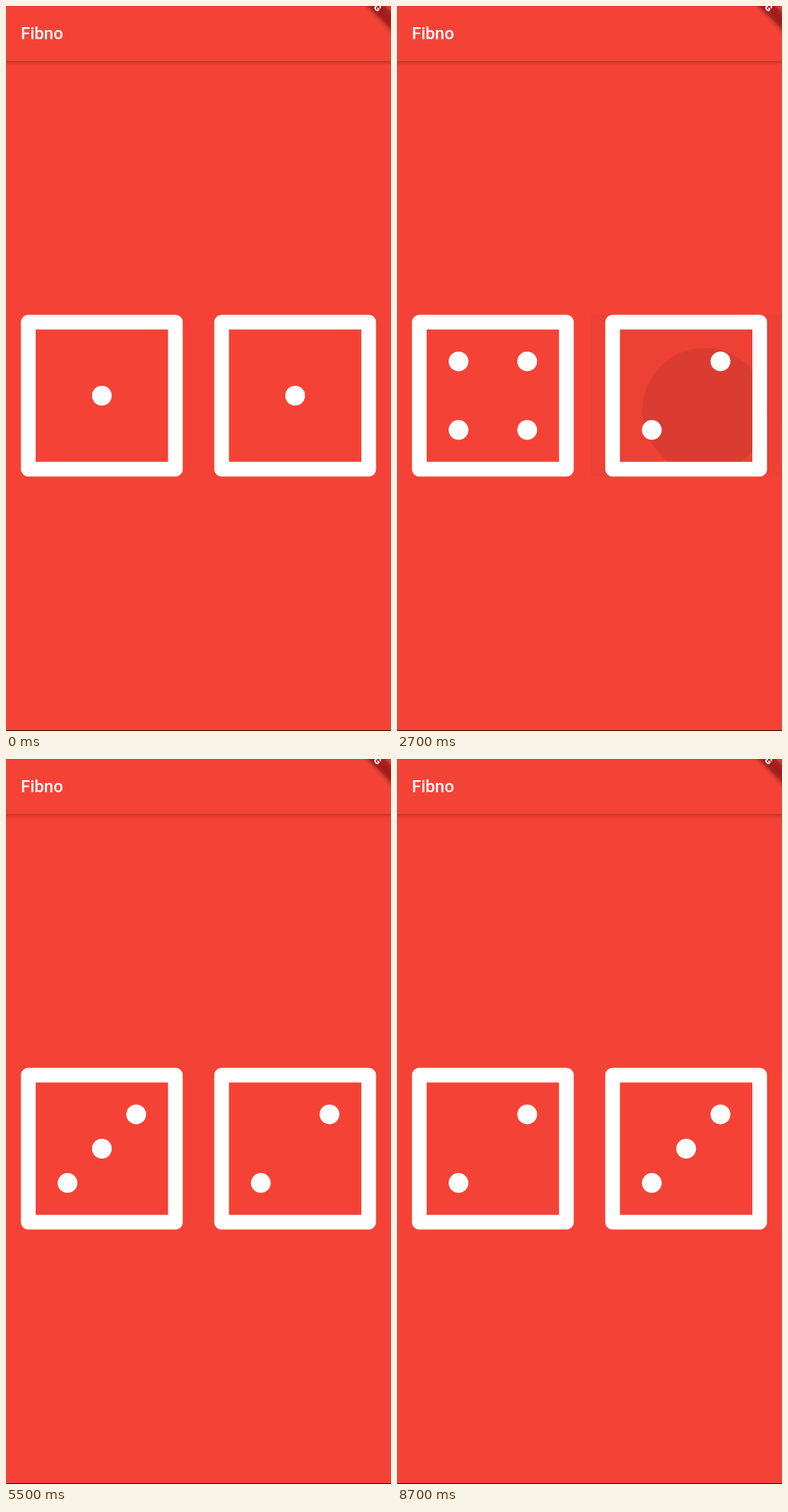
These frames come from a looping animation (545 by 1027 pixels, 8.8 s). An HTML page:

```html
<!DOCTYPE html>
<html lang="en">
<head>
<meta charset="utf-8">
<title>Dice roller</title>
<style>
  html, body { margin: 0; width: 100%; height: 100%; overflow: hidden; background: #f44336; }
  svg { display: block; width: 100%; height: 100%; }
  text { font-family: Roboto, sans-serif; fill: #fff; }
</style>
</head>
<body>
<svg viewBox="0 0 545 1027">
  <defs>
    <linearGradient id="shade" x2="0" y2="1">
      <stop offset="0" stop-color="#000" stop-opacity=".22"/>
      <stop offset=".4" stop-color="#000" stop-opacity=".09"/>
      <stop offset="1" stop-color="#000" stop-opacity="0"/>
    </linearGradient>
    <filter id="blur" x="-50%" y="-100%" width="200%" height="300%">
      <feGaussianBlur stdDeviation="3.5"/>
    </filter>
    <clipPath id="button"><rect x="274" y="437.5" width="271" height="229" rx="2.5"/></clipPath>
    <path id="frame" fill="#fff" fill-rule="evenodd"
      d="M-104.5-114.5h209a10 10 0 0 1 10 10v209a10 10 0 0 1-10 10h-209a10 10 0 0 1-10-10v-209a10 10 0 0 1 10-10z
         M-93.7-93.7v187.4h187.4v-187.4z"/>
  </defs>

  <rect width="545" height="1027" fill="#f44336"/>
  <rect y="78" width="545" height="7" fill="url(#shade)"/>
  <text x="21" y="47" font-size="24" font-weight="500">Fibno</text>
  <rect width="545" height="1" fill="#000" opacity=".1"/>

  <g transform="translate(524) rotate(45)">
    <rect x="-60" y="-8" width="120" height="16" opacity=".5" filter="url(#blur)"/>
    <rect x="-60" y="-8" width="120" height="16" fill="#b71c1c" fill-opacity=".63"/>
    <text x="3" y="4.8" font-size="13.4" font-weight="900" text-anchor="middle">G</text>
  </g>

  <g clip-path="url(#button)">
    <rect id="highlight" x="274" y="437" width="271" height="230"/>
    <circle id="ripple"/>
  </g>
  <g class="die" transform="translate(135.7 552)"><use href="#frame"/></g>
  <g class="die" transform="translate(409.3 552)"><use href="#frame"/></g>
  <rect y="1026" width="545" height="1" fill="#1a0505"/>
</svg>

<script>
const LOOP = 8800, STEP = 100, FADE = 200, INK = 0.12;
const CENTER = { x: 409.5, y: 552 };
const GAP = 48.6;

// Press time, hold length, touch point, and the faces shown on release
const taps = [
  { at: 2575, hold: 65, x: 452, y: 586, faces: [4, 2] },
  { at: 3575, hold: 65, x: 457, y: 589, faces: [5, 3] },
  { at: 4720, hold: 10, x: 488, y: 611, faces: [2, 5] },
  { at: 5250, hold: 50, x: 460, y: 592, faces: [3, 2] },
  { at: 6040, hold: 60, x: 440, y: 590, faces: [6, 5] },
  { at: 6680, hold: 60, x: 450, y: 590, faces: [2, 3] }
];

// Pip slots as [column, row, smallest test for the face]
const slots = [
  [1, -1, n => n > 1], [-1, 1, n => n > 1],
  [-1, -1, n => n > 3], [1, 1, n => n > 3],
  [-1, 0, n => n === 6], [1, 0, n => n === 6],
  [0, 0, n => n % 2 === 1]
];

const $ = id => document.getElementById(id);
const set = (el, attrs) => {
  for (const key in attrs) el.setAttribute(key, attrs[key]);
};
const clamp = v => Math.min(1, Math.max(0, v));
const mix = (a, b, k) => a + (b - a) * k;

const dice = [...document.querySelectorAll('.die')].map(die =>
  slots.map(([col, row]) => {
    const pip = document.createElementNS('http://www.w3.org/2000/svg', 'circle');
    set(pip, { cx: col * GAP, cy: row * GAP, r: 14, fill: '#fff' });
    return die.appendChild(pip);
  }));

function drawInk(tap, t) {
  const age = tap ? t - tap.at : Infinity;
  if (age > tap?.hold + FADE || !tap) {
    set($('ripple'), { opacity: 0 });
    set($('highlight'), { opacity: 0 });
    return;
  }
  const held = Math.min(age, tap.hold);
  const released = Math.max(0, age - tap.hold);
  const reach = Math.hypot(tap.x - 274, tap.y - 437.5);
  const grow = mix(held / 1000, 1, clamp(released / (reach / 1.31)));
  const fade = 1 - clamp(released / FADE);
  set($('ripple'), {
    cx: mix(tap.x, CENTER.x, grow),
    cy: mix(tap.y, CENTER.y, grow),
    r: reach * grow,
    opacity: INK * fade
  });
  set($('highlight'), { opacity: INK * clamp(held / FADE) * fade });
}

function render(t) {
  const pressed = taps.filter(tap => tap.at <= t).pop();
  const landed = taps.filter(tap => tap.at + tap.hold <= t).pop();
  const faces = landed ? landed.faces : [1, 1];
  dice.forEach((pips, d) => pips.forEach((pip, i) =>
    set(pip, { visibility: slots[i][2](faces[d]) ? 'visible' : 'hidden' })));
  drawInk(pressed, t);
}

const start = performance.now();
function tick() {
  const t = (performance.now() - start) % LOOP;
  render(Math.floor(t / STEP) * STEP);
  requestAnimationFrame(tick);
}
tick();
</script>
</body>
</html>
```
